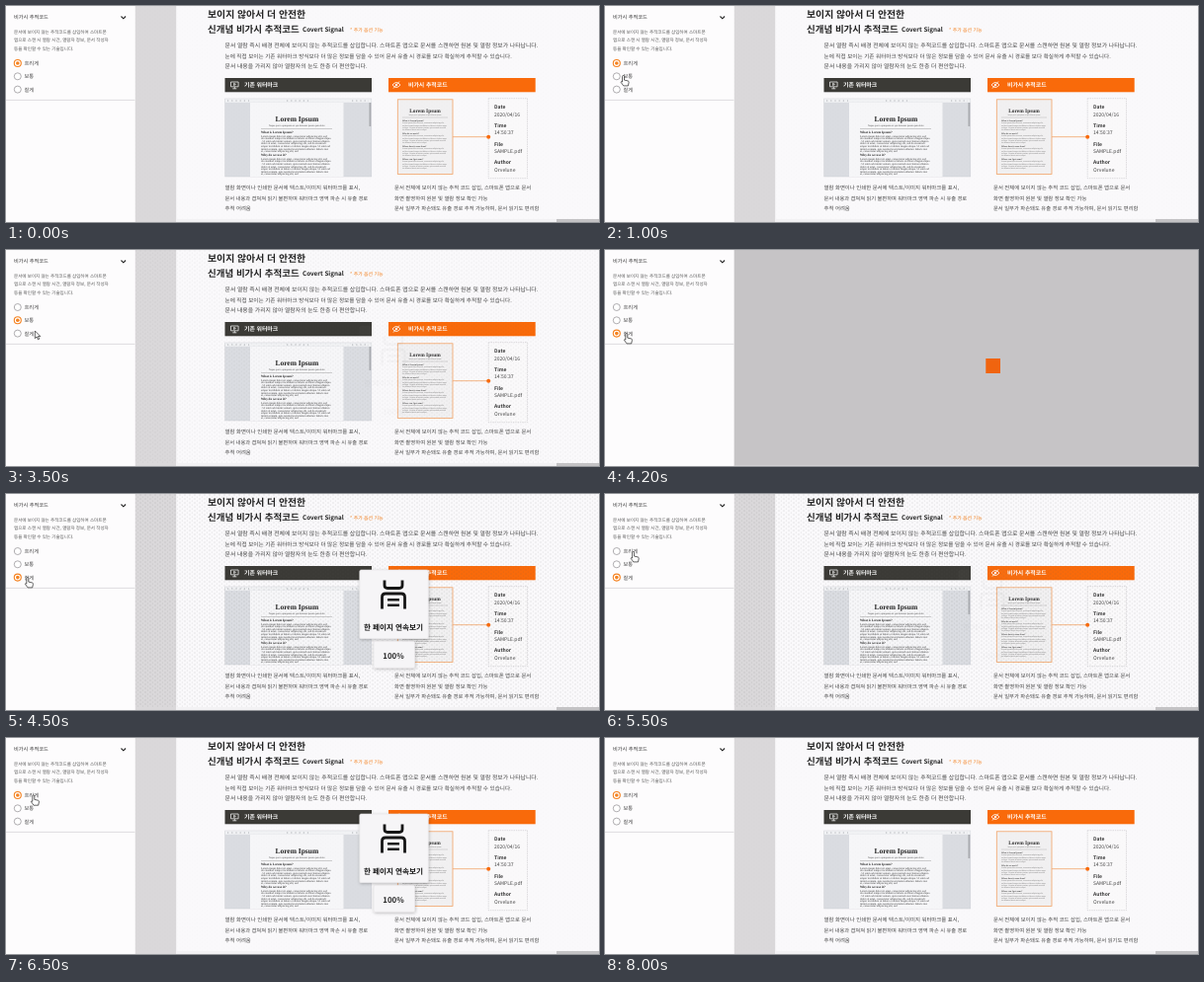
Write an HTML page that moves like this. It is 600 px wide and 219 px high and loops after 8.5 s.

```html
<!DOCTYPE html>
<html lang="ko">
<head>
<meta charset="utf-8">
<style>
  html, body { margin: 0; width: 100%; height: 100%; overflow: hidden; background: #fff; }
  svg { display: block; width: 100%; height: 100%; }
  text {
    font-family: 'Noto Sans CJK KR', 'Noto Sans CJK JP', 'Noto Sans CJK', sans-serif;
    text-rendering: geometricPrecision; white-space: pre;
  }
  .serif { font-family: 'Liberation Serif', serif; }
</style>
</head>
<body>
<svg id="stage" viewBox="0 0 600 219"></svg>
<script>
const ORANGE = '#f96a0a';
const LOREM = 'Lorem ipsum dolor sit amet, consectetur adipiscing elit, sed do eiusmod tempor incididunt ut labore et dolore magna aliqua. Ut enim ad minim veniam, quis nostrud exercitation ullamco laboris nisi ut aliquip ex ea commodo consequat. ';

// y is the visual middle of the line
const text = (x, y, size, str, fill = '#444', weight = 400, more = '') =>
  `<text x="${x}" y="${y + size * .37}" font-size="${size}" fill="${fill}" font-weight="${weight}" ${more}>${str}</text>`;
const rect = (x, y, w, h, fill, more = '') =>
  `<rect x="${x}" y="${y}" width="${w}" height="${h}" fill="${fill}" ${more}/>`;
const line = (d, stroke, width, more = '') =>
  `<path d="${d}" fill="none" stroke="${stroke}" stroke-width="${width}" ${more}/>`;
const serif = (x, y, size, str, fill, weight, anchor = 'start') =>
  text(x, y, size, str, fill, weight, `class="serif" text-anchor="${anchor}"`);

function prose(x, y, width, rows, size, gap, fill) {
  const chars = Math.round(width / size / .425);
  let out = '';
  for (let i = 0; i < rows; i++) {
    const start = i * chars % (LOREM.length - chars);
    const end = i === rows - 1 ? chars * .6 : chars;
    out += serif(x, y + i * gap, size, LOREM.substr(start, end).trim(), fill, 400);
  }
  return out;
}

function sidebar() {
  return rect(0, 0, 130.5, 219, '#fdfcfd') +
    text(8, 10.8, 5.2, '비가시 추적코드', '#333', 500) +
    line('M116.5 10.5l2.3 2.3 2.3-2.3', '#222', 1.1) +
    text(8, 26.5, 4.52, '문서에 보이지 않는 추적코드를 삽입하여 스마트폰', '#555') +
    text(8, 34.7, 4.52, '앱으로 스캔 시 열람 시간, 열람자 정보, 문서 작성자', '#555') +
    text(8, 43, 4.52, '등을 확인할 수 있는 기술입니다.', '#555') +
    ['흐리게', '보통', '짙게'].map((label, i) => {
      const y = 58 + i * 13.3;
      return `<circle class="ring" cx="11.8" cy="${y}" r="3.5" fill="#fff"/>` +
        `<circle class="dot" cx="11.8" cy="${y}" r="1.8" fill="#f58220"/>` +
        text(18.5, y, 5.3, label, '#444');
    }).join('') +
    line('M0 95.4H130.5', '#dcdadd', .9);
}

function heading() {
  return text(204, 8.7, 9.9, '보이지 않아서 더 안전한', '#222', 700) +
    text(204, 23, 9.5, '신개념 비가시 추적코드', '#222', 700) +
    text(300, 24, 6.3, 'Covert Signal', '#222', 700) +
    text(348, 24.1, 4.9, '* 추가 옵션 기능', '#f58220', 500) +
    text(221.5, 40.3, 5.87, '문서 열람 즉시 배경 전체에 보이지 않는 추적코드를 삽입합니다. 스마트폰 앱으로 문서를 스캔하면 원본 및 열람 정보가 나타납니다.') +
    text(221.5, 50.5, 5.6, '눈에 직접 보이는 기존 워터마크 방식보다 더 많은 정보를 담을 수 있어 문서 유출 시 경로를 보다 확실하게 추적할 수 있습니다.') +
    text(221.5, 60.7, 5.87, '문서 내용을 가리지 않아 열람자의 눈도 한층 더 편안합니다.');
}

function oldWay() {
  return rect(221.5, 73, 148.5, 14.3, '#3b3a36') +
    line('M227.5 77h7.6v4.8h-7.6zM231.3 81.8v2M229.3 83.8h4M230.6 78.3l1.8 1.1-1.8 1.1z', '#fff', .7) +
    text(241, 80.2, 5.9, '기존 워터마크', '#fff', 700) +
    rect(221.8, 94, 148, 79, '#dadce1', 'stroke="#c9ccd2" stroke-width=".5"') +
    rect(222, 94.2, 147.6, 3.6, '#f1f2f4') +
    line('M224 96h22M284 96h22M350 96h17', '#9a9da3', .8, 'stroke-dasharray="1.2 3"') +
    rect(247, 98, 94.5, 75, '#f6f6f8') +
    rect(367.5, 98, 1.7, 24, '#a9abb0') +
    serif(294.3, 114.3, 7.5, 'Lorem Ipsum', '#222', 700, 'middle') +
    serif(294.3, 121.5, 2.5, 'Neque porro quisquam est qui dolorem ipsum quia dolor', '#444', 400, 'middle') +
    line('M258 124.5H330', '#888', .4) +
    serif(258, 127.8, 3.3, 'What is Lorem Ipsum?', '#222', 700) +
    prose(258, 131.5, 72, 7, 2.8, 2.6, '#333') +
    serif(258, 151, 3.3, 'Why do we use it?', '#222', 700) +
    prose(258, 154.7, 72, 7, 2.8, 2.6, '#333') +
    text(221.5, 184.3, 5.4, '열람 화면이나 인쇄한 문서에 텍스트/이미지 워터마크를 표시,') +
    text(221.5, 194.8, 5.24, '문서 내용과 겹쳐져 읽기 불편하며 워터마크 영역 파손 시 유출 경로') +
    text(221.5, 205.3, 5.4, '추적 어려움');
}

function newWay() {
  const facts = [['Date', '2020/04/16'], ['Time', '14:50:37'], ['File', 'SAMPLE.pdf'], ['Author', 'Orvelune']];
  const titles = ['What is Lorem Ipsum?', 'Why do we use it?', 'Where does it come from?', 'Where can I get some?'];
  return rect(387, 73, 148.7, 14.3, ORANGE) +
    line('M391 80q4-5 8 0q-4 5-8 0M392 83.5l6-7', '#fff', .8) +
    '<circle cx="395" cy="80" r="1.2" fill="#fff"/>' +
    text(407, 80.2, 5.9, '비가시 추적코드', '#fff', 700) +
    rect(396.3, 94.8, 55.7, 75.7, '#f1f0f1', 'stroke="#f2a468" stroke-width=".8"') +
    serif(424, 105.7, 5.4, 'Lorem Ipsum', '#333', 700, 'middle') +
    serif(424, 110.7, 1.8, 'Neque porro quisquam est qui dolorem ipsum', '#666', 400, 'middle') +
    line('M401 113H447', '#aaa', .4) +
    titles.map((title, i) =>
      serif(401, 116 + i * 13, 2.2, title, '#444', 700) +
      prose(401, 118.6 + i * 13, 46, 4, 1.9, 2.2, '#666')).join('') +
    rect(488.2, 93.7, 39.3, 81, '#faf9fa', 'stroke="#d2d0d3" stroke-width=".7" stroke-dasharray="1.5 .8"') +
    line('M452 132.7H488', '#f2a468', .8) +
    `<circle cx="488.2" cy="132.7" r="2" fill="${ORANGE}"/>` +
    facts.map(([name, value], i) =>
      text(494, 102.6 + i * 18.6, 5, name, '#333', 700) +
      text(494, 109.9 + i * 18.6, 5, value, '#444')).join('') +
    text(393, 184.3, 5.37, '문서 전체에 보이지 않는 추적 코드 삽입, 스마트폰 앱으로 문서') +
    text(393, 194.8, 5.37, '화면 촬영하여 원본 및 열람 정보 확인 가능') +
    text(393, 205.3, 5.3, '문서 일부가 파손돼도 유출 경로 추적 가능하며, 문서 읽기도 편리함');
}

function popup() {
  const box = 'rx="1.5" stroke="#e2e1e3" stroke-width=".6" filter="url(#shadow)"';
  return rect(357.8, 77, 69.5, 69.7, '#f6f5f7', box) +
    rect(372, 149.3, 41.7, 27, '#f6f5f7', box) +
    line('M383 87.5v5q0 3 3 3h12q3 0 3-3v-5M380.5 116.5v-12q0-3.5 3.5-3.5h16q3.5 0 3.5 3.5v12', '#161616', 2.8) +
    line('M386 107.2h12M386 112.8h12', '#161616', 2.4) +
    text(392, 135, 7.6, '한 페이지 연속보기', '#161616', 700, 'text-anchor="middle"') +
    text(392, 164.3, 7.8, '100%', '#222', 700, 'text-anchor="middle"');
}

const stage = document.getElementById('stage');
stage.innerHTML = `
  <defs>
    <pattern id="dots" width="5" height="4" patternUnits="userSpaceOnUse">
      <circle cx="1" cy="1" r=".7" fill="#555"/><circle cx="3.4" cy="3" r=".6" fill="#555"/>
    </pattern>
    <filter id="shadow" x="-20%" y="-20%" width="140%" height="140%">
      <feDropShadow dx=".5" dy="1" stdDeviation="1.5" flood-opacity=".25"/>
    </filter>
  </defs>
  <g id="page">
    ${rect(130.5, 0, 42, 219, '#dad8da')}
    ${rect(172.5, 0, 427.5, 219, '#faf9fb')}
    ${heading()}${oldWay()}${newWay()}
    ${rect(130.5, 0, 469.5, 216, 'url(#dots)', 'id="code"')}
    ${rect(172.5, 216, 427.5, 3, '#f3f2f4')}
    ${rect(557, 216, 43, 3, '#c4c3c5')}
    <g id="popup">${popup()}</g>
  </g>
  <g id="loader">
    ${rect(130.5, 0, 469.5, 219, '#c6c4c6')}
    ${rect(130.5, 218, 469.5, 1, '#d2d0d2')}
    ${rect(385.3, 110, 14.7, 15, '#f0640f')}
  </g>
  ${sidebar()}
  <g id="cursor" stroke="#222" stroke-width=".7" stroke-linejoin="round" fill="#fff">
    <path id="hand" d="M-1 1q0-1 1-1t1 1v3.6l3.6.8q1.2.3 1 1.6l-.7 3.4h-4.7l-2.6-3.6q.1-1.2 1.4-.3z"/>
    <path id="arrow" d="M0 0v7.6l1.8-1.6 1.3 2.8 1.3-.6-1.3-2.7h2.4z"/>
  </g>`;

const el = id => document.getElementById(id);
const rings = stage.querySelectorAll('.ring');
const dots = stage.querySelectorAll('.dot');
const show = (node, on) => { node.style.display = on ? '' : 'none'; };
const clamp = v => Math.max(0, Math.min(1, v));

// click time, start of the popup's fade, chosen option
const CLICKS = [[2200, 2800, 1], [4200, 4800, 2], [6200, 6700, 0]];
// time, x, y of the pointer tip
const PATH = [[0, 72, 226], [900, 18.5, 70.5], [2700, 18.5, 70.5], [3400, 29.3, 82], [3600, 29.3, 82],
  [3700, 21.8, 84.5], [4700, 21.8, 84.5], [5400, 28.6, 58.5], [5600, 28.6, 58.5], [5700, 27.8, 57.8], [8500, 27.8, 57.8]];

function pointer(t) {
  const i = PATH.findIndex(p => p[0] > t);
  const [t0, x0, y0] = PATH[i - 1], [t1, x1, y1] = PATH[i];
  const k = (t - t0) / (t1 - t0), e = k * k * (3 - 2 * k);
  return [x0 + (x1 - x0) * e, y0 + (y1 - y0) * e];
}

function draw(now) {
  const t = Math.floor(now % 8500 / 100) * 100;
  const [click, fade, option] = CLICKS.filter(c => c[0] <= t).pop() || [-9e3, -8e3, 0];
  const age = t - click;

  show(el('loader'), age < 200);
  el('popup').style.opacity = age < 300 ? .6 : t < fade ? 1 : clamp(1 - (t - fade + 100) / 900) ** 1.8;
  el('code').style.opacity = [.02, .09, .17][option];
  rings.forEach((ring, i) => {
    ring.setAttribute('stroke', i === option ? '#f58220' : '#9b999c');
    ring.setAttribute('stroke-width', i === option ? 1.1 : .8);
    show(dots[i], i === option);
  });

  const [x, y] = pointer(t);
  const moving = t < 800 || t >= 2800 && t < 3700 || t >= 4800 && t < 5300;
  el('cursor').setAttribute('transform', `translate(${x} ${y})`);
  el('cursor').style.opacity = clamp(1 - (t - 6600) / 800);
  show(el('arrow'), moving);
  show(el('hand'), !moving);
  requestAnimationFrame(tick);
}

const begin = performance.now();
const tick = () => draw(performance.now() - begin);
tick();
</script>
</body>
</html>
```
